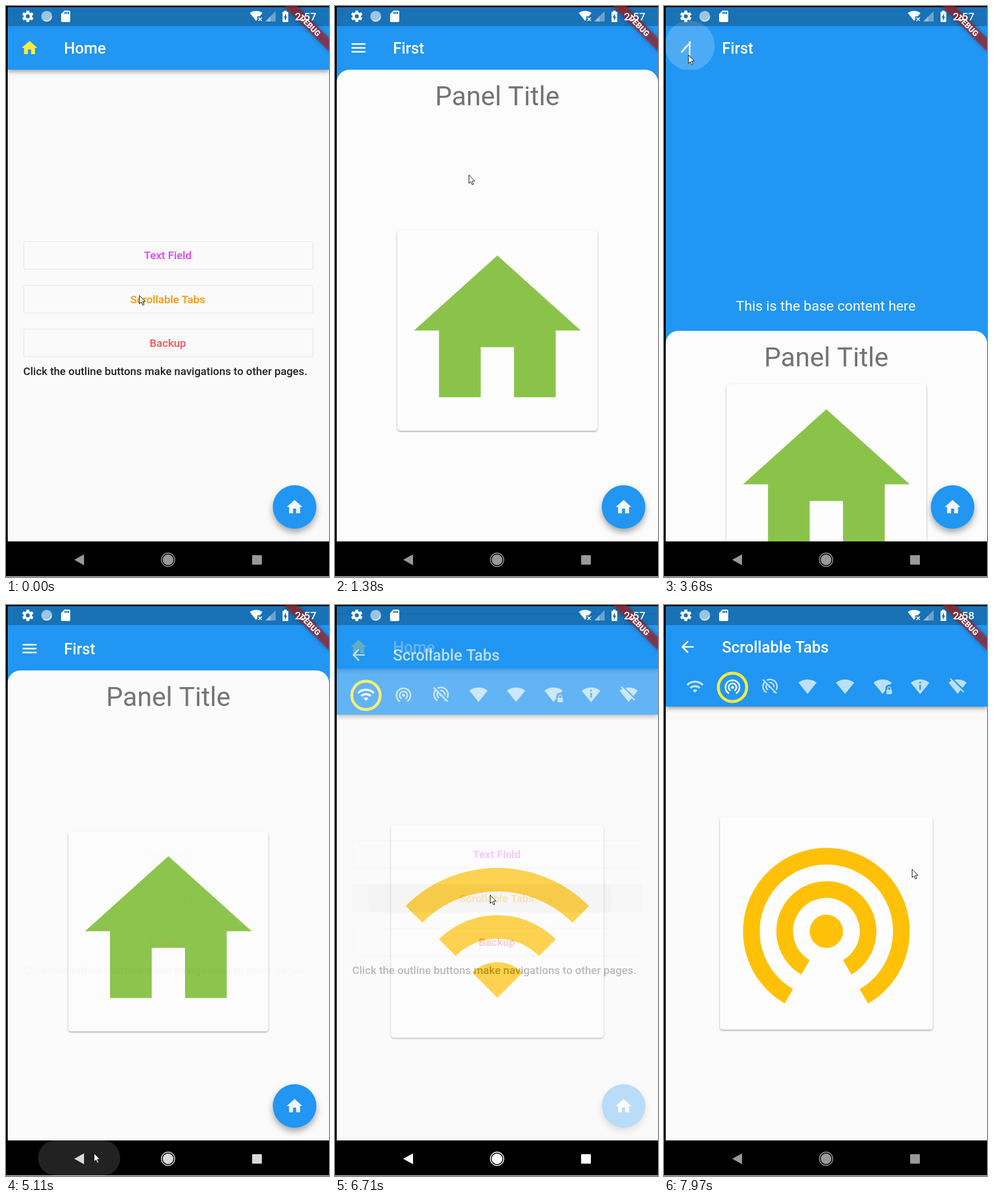
Recreate the animation shown at these times as an HTML page with a canvas. Size 563x995 px, loop 8000 ms.

```html
<!DOCTYPE html>
<html lang="en">
<head>
<meta charset="utf-8">
<title>App navigation</title>
<style>
  html, body { margin: 0; width: 100%; height: 100%; overflow: hidden; background: #000; }
  canvas { display: block; width: 563px; height: 995px; }
</style>
</head>
<body>
<canvas id="stage" width="563" height="995"></canvas>
<script>
const W = 563, H = 995, LOOP = 8000;
const LEFT = 3, TOP = 2, BOTTOM = 933, BAR = 111, MID = 283;
const DP = 1.362, UNIT = 14.53;
const BLUE = '#2196f3', YELLOW = '#ffeb3b', PAPER = '#fafafa', AMBER = '#ffc107';
const FONT = 'Roboto, sans-serif';

const screen = document.getElementById('stage').getContext('2d');
const layer = document.createElement('canvas');
layer.width = W;
layer.height = H;
const layerCtx = layer.getContext('2d');
let g = screen;

// ---- timing ----
const clamp = x => Math.max(0, Math.min(1, x));
const ramp = (t, a, b) => clamp((t - a) / (b - a));
const mix = (a, b, k) => a + (b - a) * k;
const smooth = k => k * k * (3 - 2 * k);

function bezier(x1, y1, x2, y2) {
  const at = (a, b, s) => 3 * a * s * (1 - s) ** 2 + 3 * b * s * s * (1 - s) + s ** 3;
  return x => {
    let lo = 0, hi = 1;
    for (let i = 0; i < 18; i++) {
      const m = (lo + hi) / 2;
      if (at(x1, x2, m) < x) lo = m; else hi = m;
    }
    return at(y1, y2, lo);
  };
}
const fastOutSlowIn = bezier(.4, 0, .2, 1);
const easeIn = bezier(.42, 0, 1, 1);
const ease = bezier(.25, .1, .25, 1);

// critically damped spring from 0 to 1
function spring(ms) {
  const x = Math.max(0, ms) * .0224;
  return 1 - (1 + x) * Math.exp(-x);
}

// time, x, y of the pointer tip
const pointerPath = [
  [0, 232, 504], [30, 232, 504], [230, 262, 448], [610, 293, 597], [1210, 293, 597],
  [1380, 233, 294], [1590, 150, 190], [1640, 138, 175], [1880, 42, 85], [2150, 42, 85],
  [2410, 123, 258], [2450, 123, 258], [2930, 217, 842], [3120, 217, 842], [3480, 42, 85],
  [3990, 42, 85], [4060, 39, 68], [4600, 283, 944], [4780, 262, 944], [4810, 262, 944],
  [4970, 153, 955], [5180, 153, 955], [5410, 170, 954], [5570, 170, 954], [6010, 276, 425],
  [6200, 276, 425], [6230, 277, 457], [6380, 270, 505], [7050, 270, 505], [7430, 120, 135],
  [7540, 120, 135], [7960, 432, 460], [8000, 432, 460]
];

function pointerAt(t) {
  const i = pointerPath.findIndex(p => p[0] > t);
  const [ta, xa, ya] = pointerPath[i - 1], [tb, xb, yb] = pointerPath[i];
  const k = smooth(ramp(t, ta, tb));
  return [mix(xa, xb, k), mix(ya, yb, k)];
}

// ---- drawing helpers ----
function rect(x, y, w, h, fill) {
  g.fillStyle = fill;
  g.fillRect(x, y, w, h);
}

function disc(x, y, r, fill) {
  g.beginPath();
  g.arc(x, y, r, 0, 7);
  g.fillStyle = fill;
  g.fill();
}

function round(x, y, w, h, r, fill) {
  g.beginPath();
  g.roundRect(x, y, w, h, r);
  g.fillStyle = fill;
  g.fill();
}

function shape(points, fill) {
  g.beginPath();
  points.forEach(p => g.lineTo(...p));
  g.closePath();
  g.fillStyle = fill;
  g.fill();
}

function line(x1, y1, x2, y2, width, color) {
  g.beginPath();
  g.moveTo(x1, y1);
  g.lineTo(x2, y2);
  g.lineWidth = width;
  g.strokeStyle = color;
  g.stroke();
}

function text(s, x, y, size, color, weight = 400, align = 'left') {
  g.font = `${weight} ${size}px ${FONT}`;
  g.textAlign = align;
  g.fillStyle = color;
  g.fillText(s, x, y);
}

function shadowed(color, blur, dy, draw) {
  g.save();
  g.shadowColor = color;
  g.shadowBlur = blur;
  g.shadowOffsetY = dy;
  draw();
  g.restore();
}

function clipped(x, y, w, h, draw) {
  g.save();
  g.beginPath();
  g.rect(x, y, w, h);
  g.clip();
  draw();
  g.restore();
}

// ---- icons on a 24 unit grid ----
const FAN = 'M12 21.5L23.64 7c-.45-.34-4.93-4-11.64-4C5.28 3 .81 6.66.36 7z';
const paths = {
  home: 'M10 20v-6h4v6h5v-8h3L12 3 2 12h3v8z',
  back: 'M20 11H7.83l5.59-5.59L12 4l-8 8 8 8 1.41-1.41L7.83 13H20z',
  wifi: 'M1 9l2 2c4.97-4.97 13.03-4.97 18 0l2-2C16.93 2.93 7.08 2.93 1 9zm8 8l3 3 3-3c-1.65-1.66-4.34-1.66-6 0z' +
    'm-4-4l2 2c2.76-2.76 7.24-2.76 10 0l2-2C15.14 9.14 8.87 9.14 5 13z',
  fan: FAN,
  lock: 'M15.5 14.5c0-2.8 2.2-5 5-5 .36 0 .71.04 1.05.11L23.64 7c-.45-.34-4.93-4-11.64-4C5.28 3 .81 6.66.36 7L12 21.5l3.5-4.36z' +
    'M23 16v-1.5c0-1.4-1.1-2.5-2.5-2.5S18 13.1 18 14.5V16c-.5 0-1 .5-1 1v4c0 .5.5 1 1 1h5c.5 0 1-.5 1-1v-4c0-.5-.5-1-1-1z' +
    'm-1 0h-3v-1.5c0-.8.7-1.5 1.5-1.5s1.5.7 1.5 1.5z',
  info: 'M12 3C6.95 3 3.15 4.85 0 7.23L12 22 24 7.25C20.85 4.87 17.05 3 12 3zm1 13h-2v-6h2zm-2-8V6h2v2z',
  off: 'M23.64 7c-.45-.34-4.93-4-11.64-4-1.5 0-2.89.19-4.15.48L18.18 13.8z' +
    'M17.04 15.22L3.27 1.44 2 2.72l2.05 2.06C1.91 5.76.59 6.82.36 7L12 21.5l3.91-4.87 3.32 3.32 1.27-1.27z',
  bolt: 'M15.67 4H14V2h-4v2H8.33C7.6 4 7 4.6 7 5.33v15.33C7 21.4 7.6 22 8.33 22h7.33c.74 0 1.34-.6 1.34-1.33V5.33C17 4.6 16.4 4 15.67 4z' +
    'M11 20v-5.5H9L13 7v5.5h2z',
  card: 'M18 2h-8L4.02 8 4 20c0 1.1.9 2 2 2h12c1.1 0 2-.9 2-2V4c0-1.1-.9-2-2-2zm-6 6h-2V4h2zm3 0h-2V4h2zm3 0h-2V4h2z'
};
for (const k in paths) paths[k] = new Path2D(paths[k]);

function waves(cy, color) {
  disc(12, cy, 2, color);
  g.strokeStyle = color;
  g.lineWidth = 2;
  for (const r of [5, 9]) {
    g.beginPath();
    g.arc(12, cy, r, Math.PI * 2 / 3, Math.PI * 7 / 3);
    g.stroke();
  }
}

const drawn = {
  tether: color => waves(13, color),
  tetherOff(color) {
    waves(12, color);
    line(4, 1.7, 21.7, 19.4, 2, BLUE);
    line(2.6, 3.1, 20.4, 20.9, 1.8, color);
  },
  gear(color) {
    g.translate(12, 12);
    for (let i = 0; i < 6; i++) {
      rect(-2.5, -10, 5, 5, color);
      g.rotate(Math.PI / 3);
    }
    g.beginPath();
    g.arc(0, 0, 5.5, 0, 7);
    g.lineWidth = 4;
    g.strokeStyle = color;
    g.stroke();
  }
};

function icon(name, cx, cy, scale, color) {
  g.save();
  g.translate(cx - 12 * scale, cy - 12 * scale);
  g.scale(scale, scale);
  if (drawn[name]) drawn[name](color);
  else {
    g.fillStyle = color;
    g.fill(paths[name], 'evenodd');
  }
  g.restore();
}

// ---- shared parts ----
function appBar(title, bottom) {
  shadowed('rgba(0,0,0,.4)', 8, 3, () => rect(LEFT, TOP, W - LEFT, bottom - TOP, BLUE));
  text(title, 101, 83, 27.24, '#fff', 500);
}

function card(x, y, w, h) {
  shadowed('rgba(0,0,0,.35)', 3, 1.5, () => round(x, y, w, h, 5.4, '#fdfdfd'));
}

function fab() {
  shadowed('rgba(0,0,0,.35)', 12, 6, () => disc(503, 873, 38, BLUE));
  icon('home', 503, 873, DP, '#f8f8f8');
}

// ---- pages ----
const buttons = [
  ['Text Field', 410, '#e040fb', 0],
  ['Scrollable Tabs', 486.5, '#ff9800', 6400],
  ['Backup', 562.5, '#ff5252', 830]
];

function homePage(t) {
  rect(LEFT, TOP, W - LEFT, BOTTOM - TOP, PAPER);
  appBar('Home', BAR);
  icon('home', 41, 73, DP, YELLOW);
  for (const [label, y, color, press] of buttons) {
    const age = t - press;
    if (press && age > 0 && age < 480) {
      const fade = 1 - ramp(age, 200, 480);
      rect(31, y, 504, 48.5, `rgba(0,0,0,${.08 * fade * ramp(age, 0, 80)})`);
      clipped(31, y, 504, 48.5, () =>
        disc(press > 1000 ? 270 : 293, y + 25, mix(10, 270, ramp(age, 0, 400)), `rgba(0,0,0,${.08 * fade})`));
    }
    g.strokeStyle = '#e6e6e6';
    g.lineWidth = 1.2;
    g.beginPath();
    g.roundRect(31, y + .5, 504, 48, 2);
    g.stroke();
    text(label, MID - 1, y + 31, 19.07, color, 500, 'center');
  }
  text('Click the outline buttons make navigations to other pages.', 30, 643, 19.07, '#212121', 500);
}

function bar(x, y, len, angle) {
  g.save();
  g.translate(x, y);
  g.rotate(angle * Math.PI / 180);
  rect(-len / 2, -1.35, len, 2.7, '#fff');
  g.restore();
}

// p = 1 is the menu, p = 0 the cross
function menuIcon(p) {
  const s = Math.sin(Math.PI * p);
  bar(41 - 3 * s, 73 - 6.8 * p * p, 24.5, -48 * clamp((1 - p) * 1.6));
  bar(41 + 4 * s, 73 + 6.8 * p * p, 24.5, 135 * (1 - p) + 12 * s * (1 - p));
  if (p > .2) bar(41 - 5 * s, 73, 24.5 * clamp(p * 1.25 - .25), -55 * s);
}

function menuRipple(t, press) {
  const alpha = .2 * (1 - ramp(t, press + 170, press + 380));
  if (t < press || alpha <= 0) return;
  clipped(LEFT, TOP, W, BAR - TOP, () =>
    disc(45, 69, mix(10, 43.5, ramp(t, press, press + 130)), `rgba(255,255,255,${alpha})`));
}

function firstPage(t) {
  const open = t < 3000 ? 1 - spring(t - 1980) : spring(t - 3622);
  const top = mix(846, BAR, open);
  rect(LEFT, TOP, W - LEFT, BOTTOM - TOP, BLUE);
  text('First', 101, 83, 27.24, '#fff', 500);
  menuRipple(t, 1900);
  menuRipple(t, 3530);
  menuIcon(open);
  text('This is the base content here', MID - 1, 530.5, 24.5, '#fff', 400, 'center');
  clipped(LEFT, TOP, W - LEFT, BOTTOM - TOP, () => {
    round(LEFT, top, W - LEFT, BOTTOM - top + 40, [22, 22, 0, 0], '#fcfcfc');
    text('Panel Title', MID, top + 61.5, 46.3, '#737373', 400, 'center');
    const y = Math.max((top + 87 + BOTTOM) / 2 - 174.4, top + 93);
    card(108.5, y, 349, 349);
    icon('home', MID, y + 174.4, UNIT, '#8bc34a');
  });
}

const tabs = ['wifi', 'tether', 'tetherOff', 'fan', 'fan', 'lock', 'info', 'off'];

function tabsPage(t) {
  const slide = ease(ramp(t, 7540, 7840));
  rect(LEFT, TOP, W - LEFT, BOTTOM - TOP, '#fbfbfb');
  clipped(LEFT, 177, W - LEFT, BOTTOM - 177, () => {
    tabs.slice(0, 2).forEach((name, i) => {
      const dx = (i - slide) * (W - LEFT);
      if (Math.abs(dx) >= W - LEFT) return;
      card(97.5 + dx, 369.5, 371, 370.5);
      icon(name, MID + dx, 554, UNIT, AMBER);
    });
  });
  appBar('Scrollable Tabs', 177);
  icon('back', 41, 73, DP, '#fff');
  tabs.forEach((name, i) => {
    const picked = i === 0 ? 1 - slide : i === 1 ? slide : 0;
    const k = mix(.7, 1, picked);
    const color = `rgb(${mix(33, 255, k)},${mix(150, 255, k)},${mix(243, 255, k)})`;
    icon(name, 54 + i * 65.4, 142, DP, color);
  });
  g.beginPath();
  g.arc(54 + 65.4 * slide, 143.5, 24.7, 0, 7);
  g.lineWidth = 5;
  g.strokeStyle = YELLOW;
  g.stroke();
}

// A route slides up a quarter of the screen while it fades in.
function route(v, page, t) {
  if (v <= 0) return;
  g = layerCtx;
  g.clearRect(0, 0, W, H);
  page(t);
  g = screen;
  clipped(LEFT, TOP, W - LEFT, BOTTOM - TOP, () => {
    g.globalAlpha = clamp(easeIn(v) * 1.25);
    g.drawImage(layer, 0, Math.round((BOTTOM - TOP) * .25 * (1 - fastOutSlowIn(v))));
  });
}

// ---- system parts ----
function banner() {
  g.save();
  g.translate(W, TOP);
  g.rotate(Math.PI / 4);
  shadowed('rgba(0,0,0,.5)', 7, 0, () => rect(-55, 38.1, 110, 16.4, 'rgba(183,28,28,.63)'));
  text('DEBUG', 0, 51.2, 13.9, '#fff', 900, 'center');
  g.restore();
}

function statusBar(t) {
  rect(LEFT, TOP, W - LEFT, 33, 'rgba(0,0,0,.25)');
  banner();
  icon('gear', 38, 18, 1, '#fff');
  disc(71, 18, 9.5, '#9cc4e4');
  g.beginPath();
  g.arc(70.5, 17.5, 8.5, .2, 2.2);
  g.lineWidth = 1.6;
  g.strokeStyle = '#e4f0f9';
  g.stroke();
  icon('card', 104, 18, 1, '#fff');
  icon('fan', 436, 17, .95, '#fff');
  rect(438, 18, 10, 10, '#1a70b6');
  line(440, 20, 446, 26, 1.7, '#fff');
  line(446, 20, 440, 26, 1.7, '#fff');
  shape([[452, 27], [470, 9], [470, 27]], 'rgba(255,255,255,.35)');
  shape([[452, 27], [461, 18], [461, 27]], 'rgba(255,255,255,.3)');
  icon('bolt', 487, 18, 1, '#fff');
  text(t < 7800 ? '2:57' : '2:58', 541, 25, 19.07, '#fff', 500, 'right');
}

function navBar(t) {
  rect(0, BOTTOM, W, 61, '#000');
  rect(0, 994, W, 1, '#f4f4f4');
  const glow = ramp(t, 4980, 5060) * (1 - ramp(t, 5140, 5400));
  if (glow > 0) {
    const w = mix(60, 143, ramp(t, 4980, 5090));
    round(127.5 - w / 2, BOTTOM, w, 61, 30, `rgba(255,255,255,${.135 * glow})`);
  }
  const lit = ramp(t, 5020, 5165) * (1 - ramp(t, 7350, 7880));
  const v = Math.round(mix(153, 255, lit));
  const color = `rgb(${v},${v},${v})`;
  shape([[119, 965], [136, 955.5], [136, 974.5]], color);
  disc(282.5, 965, 9.3, color);
  g.beginPath();
  g.arc(282.5, 965, 11.6, 0, 7);
  g.lineWidth = 1.6;
  g.strokeStyle = color;
  g.stroke();
  round(429, 957, 17, 16.5, 1, color);
}

function pointer(t) {
  const [x, y] = pointerAt(t);
  g.save();
  g.translate(Math.round(x) + .5, Math.round(y) + .5);
  shape([[0, 0], [0, 14.5], [3.3, 11.5], [5.8, 17], [8, 16], [5.6, 10.6], [10.3, 10.4]], '#fff');
  g.lineWidth = 1;
  g.strokeStyle = '#111';
  g.stroke();
  g.restore();
}

function render(t) {
  g = screen;
  rect(0, 0, W, H, '#000');
  homePage(t);
  route(ramp(t, 930, 1230) * (1 - ramp(t, 5070, 5370)), firstPage, t);
  fab();
  route(ramp(t, 6500, 6800), tabsPage, t);
  statusBar(t);
  navBar(t);
  rect(0, 0, LEFT, BOTTOM, '#000');
  pointer(t);
}

const start = performance.now();
function tick() {
  render((performance.now() - start) % LOOP);
  requestAnimationFrame(tick);
}
tick();
</script>
</body>
</html>
```
